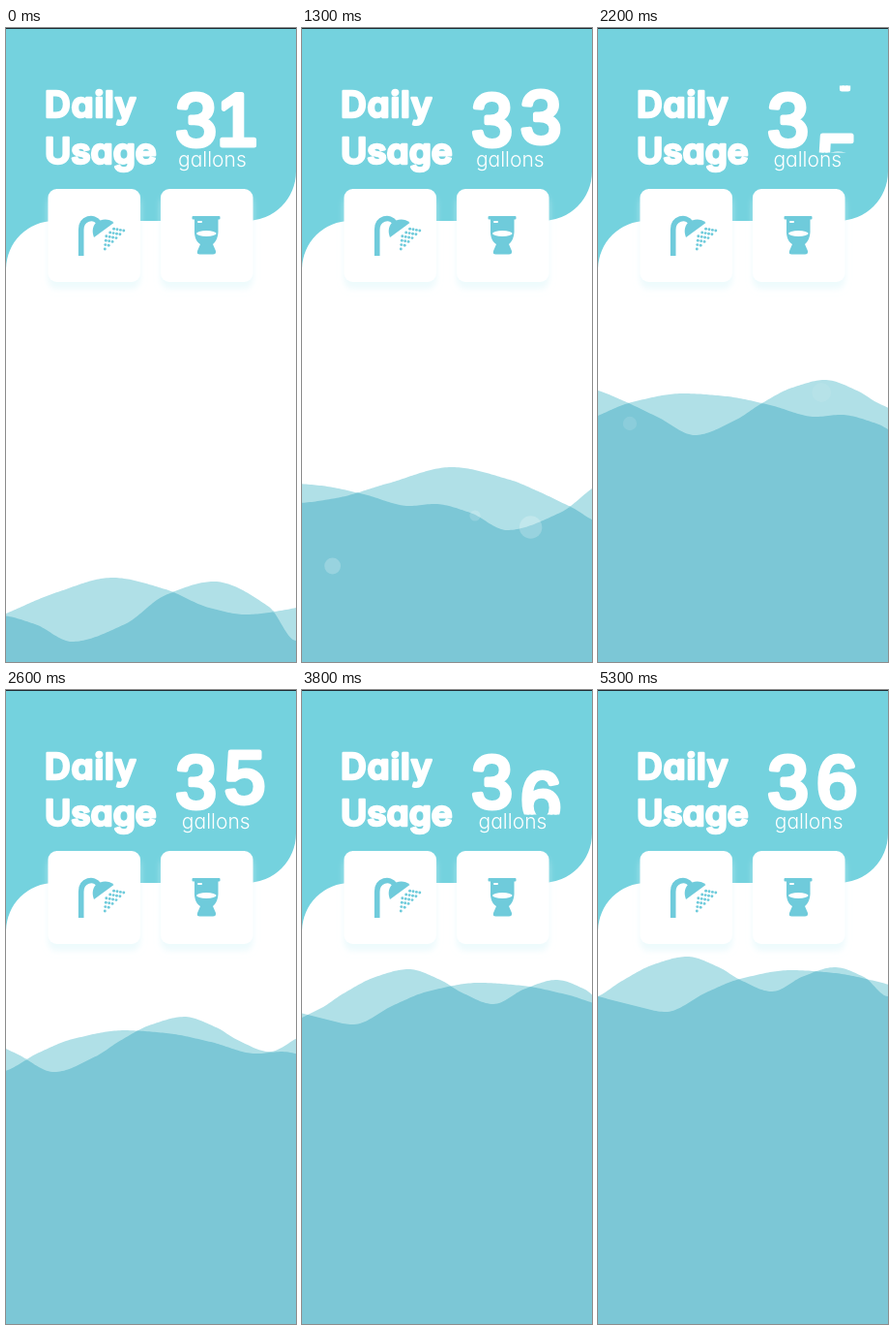
These frames come from a looping animation (300 px wide and 654 px high, 6400 ms). An HTML page:

```html
<!DOCTYPE html>
<html lang="en">
<head>
<meta charset="utf-8">
<title>Daily Usage</title>
<style>
  html, body { margin: 0; width: 100%; height: 100%; overflow: hidden; background: #fff; }
  svg { display: block; width: 100vw; height: 100vh; }
  text { fill: #fff; }
  .title { font: 600 37px Inter, sans-serif; font-feature-settings: "cv11"; stroke: #fff; stroke-width: 2.6; stroke-linejoin: round; }
  .unit { font: 300 21px Inter, sans-serif; font-feature-settings: "cv11"; }
  .digit { font: 400 76px "Liberation Sans", Arial, sans-serif; stroke: #fff; stroke-width: 5; stroke-linejoin: round; }
  .card { fill: #fff; filter: url(#shadow); }
  .icon { fill: #6fcbdb; }
</style>
</head>
<body>
<svg viewBox="0 0 300 654" preserveAspectRatio="none">
  <defs>
    <filter id="shadow" x="-20%" y="-20%" width="140%" height="150%">
      <feDropShadow dx="0" dy="7" stdDeviation="3" flood-color="#dff7fa" flood-opacity=".55"/>
    </filter>
    <clipPath id="window"><rect x="218" y="59.5" width="60" height="69"/></clipPath>
  </defs>

  <path fill="#74d2de" d="M0 0H300V148A51 51 0 0 1 249 199H50A50 50 0 0 0 0 248Z"/>
  <rect width="300" height="1" fill="#1f2c33"/>

  <path id="light" fill="#b0e0e7"/>
  <path id="dark" fill="#7cc7d6"/>
  <g id="bubbles" fill="#fff"></g>

  <text class="title" x="40" y="92" letter-spacing=".8">Daily</text>
  <text class="title" x="40" y="139.5">Usage</text>
  <text class="digit" x="175.5" y="121">3</text>
  <g clip-path="url(#window)"><g id="reel"></g></g>
  <text class="unit" id="unit" y="142.5">gallons</text>

  <rect class="card" x="43.5" y="166" width="95.5" height="96" rx="9"/>
  <rect class="card" x="160" y="166" width="95.5" height="96" rx="9"/>

  <g class="icon">
    <path d="M77.7 235V208C77.7 196 91 193 96 201" fill="none" stroke="#6fcbdb" stroke-width="5.6"/>
    <path d="M91 216L111.5 201C106 196 98 197 93 201C89 205 89 211 91 216Z"/>
    <g id="drops"></g>
  </g>
  <g class="icon">
    <rect x="192.5" y="194" width="29" height="3.4" rx="1"/>
    <path d="M195 196H219.5V208C220 215 217 221 214 223L217 230Q217.5 233.5 214 233.5H200.500Q197 233.5 198 230L201 223C197 221 194.500 215 195 208Z"/>
    <rect x="198" y="199" width="5" height="2" rx="1" fill="#fff"/>
    <ellipse cx="207.300" cy="212" rx="10.300" ry="2.900" fill="#fff"/>
  </g>
</svg>
<script>
const LOOP = 6400, STEP = 100;
const WIDTH = 300, HEIGHT = 654;
const byId = id => document.getElementById(id);

function add(parent, tag, attrs) {
  const node = document.createElementNS('http://www.w3.org/2000/svg', tag);
  for (const key in attrs) node.setAttribute(key, attrs[key]);
  return parent.appendChild(node);
}

// Monotone cubic through the given points, flat beyond both ends.
function spline(xs, ys) {
  const last = xs.length - 1;
  const secant = i => (ys[i + 1] - ys[i]) / (xs[i + 1] - xs[i]);
  const slopes = xs.map((_, i) => {
    if (i === 0) return secant(0);
    if (i === last) return 0;
    const a = secant(i - 1), b = secant(i);
    return a * b > 0 ? 2 * a * b / (a + b) : 0;
  });
  return x => {
    if (x <= xs[0]) return ys[0];
    if (x >= xs[last]) return ys[last];
    let i = 0;
    while (x > xs[i + 1]) i++;
    const h = xs[i + 1] - xs[i], u = (x - xs[i]) / h, v = 1 - u;
    return v * v * ((1 + 2 * u) * ys[i] + u * h * slopes[i])
         + u * u * ((1 + 2 * v) * ys[i + 1] - v * h * slopes[i + 1]);
  };
}
const shape = points => spline(points.map(p => p[0]), points.map(p => p[1]));

const times = [400, 900, 1300, 2200, 3000, 3800, 5300];
const level = spline(times, [595, 525, 480, 388, 342, 313, 300]);
const count = spline(times, [0, 1.11, 2.03, 3.58, 4.41, 4.83, 5]);
const leftward = spline(times, [613, 483, 358, 143, 58, 18, 0]);
const rightward = spline(times, [370, 293, 226, 112, 52, 17, 0]);

const swellA = shape([
  [-613, 9], [-560, -13], [-503, -28], [-448, -16], [-403, 3], [-365, 10],
  [-323, 5], [-270, -10], [-203, -27], [-143, -14], [-118, -4], [-80, 14],
  [-43, 32], [0, 16], [25, 0], [58, -17], [92, -25], [125, -14], [147, -1],
  [180, 11], [213, -5], [245, -14], [275, -4], [300, 16]]);
const swellB = shape([
  [0, 16], [35, 25], [70, 32], [112, 12], [147, -2], [200, -11], [245, -8],
  [290, 1], [337, 13], [363, 11], [400, 20], [438, 38], [493, 20],
  [535, -10], [585, -24], [642, 2], [670, 37]]);

const bubbleTimes = [400, 900, 1300, 2200, 2600];
const bubbles = [
  { x: 239, drift: -.006, r: 12.6, y: [715, 599, 515, 376, 345], alpha: [.25, .25, .22, .08, 0] },
  { x: 177, drift: .005, r: 6, y: [840, 650, 503, 400, 380], alpha: [.25, .25, .17, 0, 0] },
  { x: 31, drift: .0015, r: 9, y: [755, 644, 555, 408, 370], alpha: [.25, .25, .22, .12, 0] }
].map(b => ({
  ...b,
  y: spline(bubbleTimes, b.y),
  alpha: spline(bubbleTimes, b.alpha),
  node: add(byId('bubbles'), 'circle', {})
}));

const PITCH = 100;
for (let n = 1; n <= 6; n++) {
  add(byId('reel'), 'text', { class: 'digit', x: n === 1 ? 218 : 226, y: 121 + (n - 1) * PITCH }).textContent = n;
}

for (let row = 0; row < 4; row++) {
  for (let i = 0; i < 6 - row; i++) {
    add(byId('drops'), 'circle', { cx: 102.3 + row * .5 + i * 3.9, cy: 228 - row * 4.4 - i * 3.8, r: 1.45 });
  }
}

function fillBelow(id, top) {
  let d = `M0 ${HEIGHT}`;
  for (let x = 0; x <= WIDTH; x += 2) d += `L${x} ${top(x).toFixed(2)}`;
  byId(id).setAttribute('d', d + `V${HEIGHT}Z`);
}

function draw(t) {
  const base = level(t), a = leftward(t), b = rightward(t), n = count(t);
  const waveA = x => base + swellA(x - a);
  const waveB = x => base + swellB(x + b);
  fillBelow('light', x => Math.min(waveA(x), waveB(x)));
  fillBelow('dark', x => Math.max(waveA(x), waveB(x)));

  for (const bubble of bubbles) {
    const age = t - 900;
    bubble.node.setAttribute('cx', bubble.x + bubble.drift * age);
    bubble.node.setAttribute('cy', bubble.y(t));
    bubble.node.setAttribute('r', bubble.r * (1 - age * .00016));
    bubble.node.setAttribute('opacity', bubble.alpha(t));
  }

  byId('reel').setAttribute('transform', `translate(0 ${-n * PITCH})`);
  byId('unit').setAttribute('x', 178 + .95 * n);
}

function tick() {
  const t = performance.now() % LOOP;
  draw(Math.min(5300, Math.max(400, Math.floor(t / STEP) * STEP)));
  requestAnimationFrame(tick);
}
tick();
</script>
</body>
</html>
```
